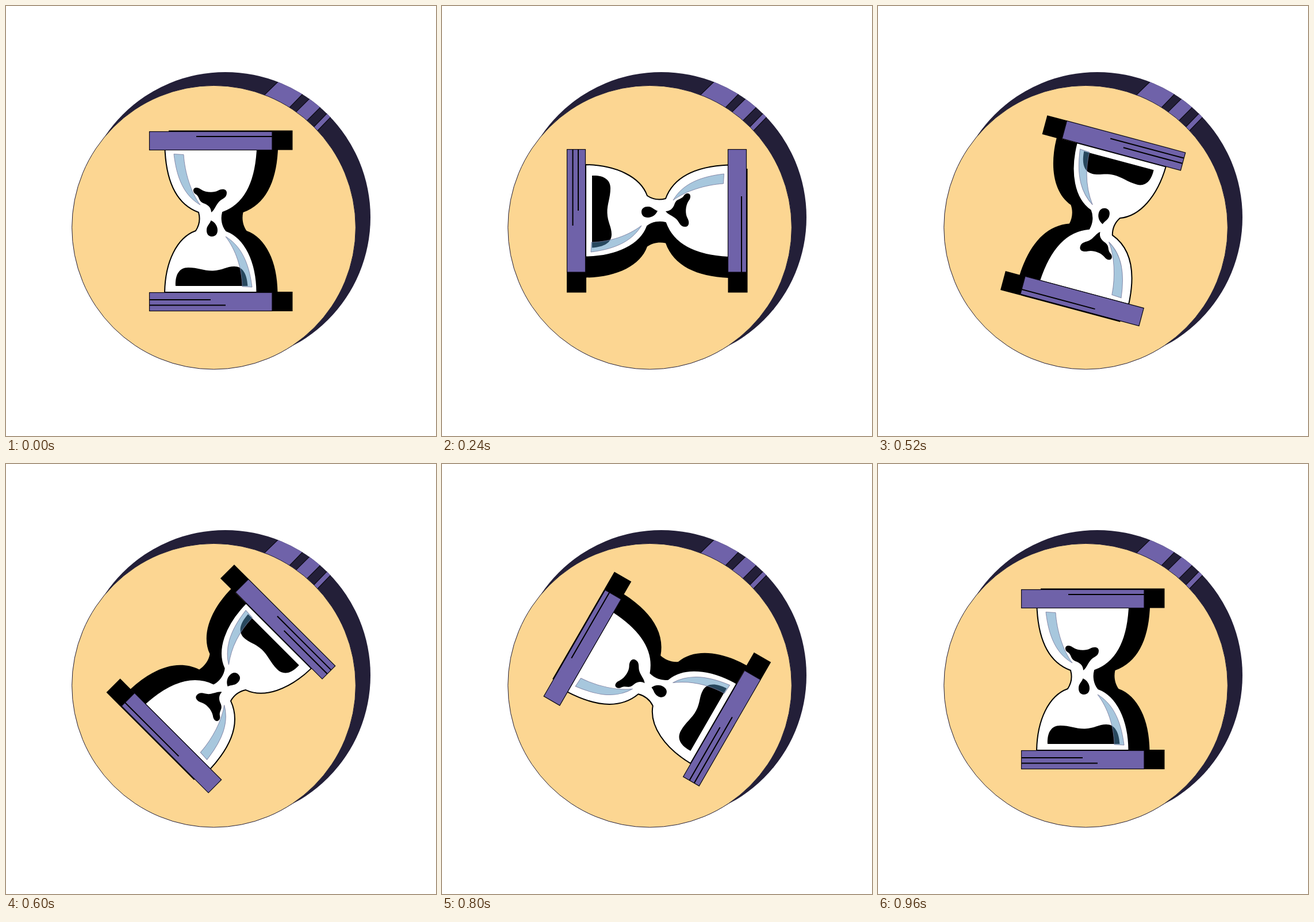
An HTML page that plays this animation: 748 px wide and 748 px high, repeating every 1200 ms.

```html
<!DOCTYPE html>
<html lang="en">
<head>
<meta charset="utf-8">
<title>Hourglass coin</title>
<style>
  html, body { margin: 0; width: 100%; height: 100%; overflow: hidden; background: #fff; }
  svg { display: block; width: 100%; height: 100%; }
  .rim { fill: #231f38; }
  .face { fill: #fcd692; stroke: #231f38; stroke-width: 1; }
  .purple { fill: #6f62a9; stroke: #0a0812; stroke-width: 1.2; }
  .line { fill: none; stroke: #000; stroke-width: 2; }
  .glass { fill: #fff; stroke: #000; stroke-width: 2; }
  .shine { fill: #508fbc; fill-opacity: .5; stroke: #77779a; stroke-opacity: .8; stroke-width: 1; }
</style>
</head>
<body>
<svg viewBox="0 0 748 748">
  <defs>
    <clipPath id="rimClip"><circle cx="381.5" cy="367.5" r="252.5"/></clipPath>
  </defs>

  <!-- coin -->
  <circle class="rim" cx="381.5" cy="367.5" r="252.5"/>
  <g class="purple" clip-path="url(#rimClip)">
    <path d="M476 129 L518 151 L488 182 L445 159Z"/>
    <path d="M530 159 L550 173 L519 204 L500 189Z"/>
    <path d="M561 184 L568 190 L537 222 L531 215Z"/>
  </g>
  <circle class="face" cx="361.5" cy="385.2" r="246.8"/>

  <g id="hourglass">
    <!-- side shadow -->
    <path d="M356 250 H473 C470.5 305 452 345 412.5 359 C410 370 412 382 418.5 391 C452 403 472 445 472.5 498 H356Z"/>

    <path class="glass" d="M276.5 250 C279 305 297 345 335 359 C338 370 336 382 330 391 C297 403 277 445 276 498 H436.5 C436 445 416 403 383 391 C376 382 374 370 377 359 C416 345 434 305 437 250Z"/>

    <!-- sand -->
    <path d="M326 322 C325 315 333 314 339 319 C348 325 362 325 369 321 C376 317 384 318 384 325 C384 334 376 335 371 340 C365 346 363 355 357 359 C357 352 353 347 346 344 C334 340 338 334 331 328 C328 326 327 325 326 322Z"/>
    <path d="M356.5 373 C363 376 368 382 368 390 C368 397 364 401 358 401 C352 401 348.5 396 349 389 C349.5 382 354 380 356.5 373Z"/>
    <path d="M295 487 C294 468 301 455 317 455 C334 455 345 461 360 460.5 C376 460 384 453 397 453 C412 453 419 466 420.5 487Z"/>

    <path class="shine" d="M292 257.5 L309 258.5 C311 290 322 325 338 346 C310 330 297 300 292 257.5Z"/>
    <path class="shine" d="M382 401 C405 415 422 440 428 489 L411 488 C410 455 400 425 382 401Z"/>

    <!-- end plates -->
    <rect x="463" y="216.5" width="35.5" height="34"/>
    <rect class="purple" x="249.5" y="218.5" width="213.5" height="32"/>
    <path class="line" d="M283 217.5 H463 M331 227 H463"/>
    <rect x="463" y="497" width="35.5" height="34"/>
    <rect class="purple" x="249.5" y="498.5" width="213.5" height="32"/>
    <path class="line" d="M250 511 H356 M250 520.5 H382"/>
  </g>
</svg>
<script>
  const LOOP = 1200, STEP = 40, TURN = 15;
  const hourglass = document.getElementById('hourglass');

  // One full turn in 24 ticks, then a rest until the loop ends.
  function draw(ms) {
    const tick = Math.min(24, Math.floor((ms % LOOP) / STEP));
    hourglass.setAttribute('transform', `rotate(${tick * TURN % 360} 374 374)`);
  }

  let start;
  function frame(now) {
    start ??= now;
    draw(now - start);
    requestAnimationFrame(frame);
  }
  draw(0);
  requestAnimationFrame(frame);
</script>
</body>
</html>
```
